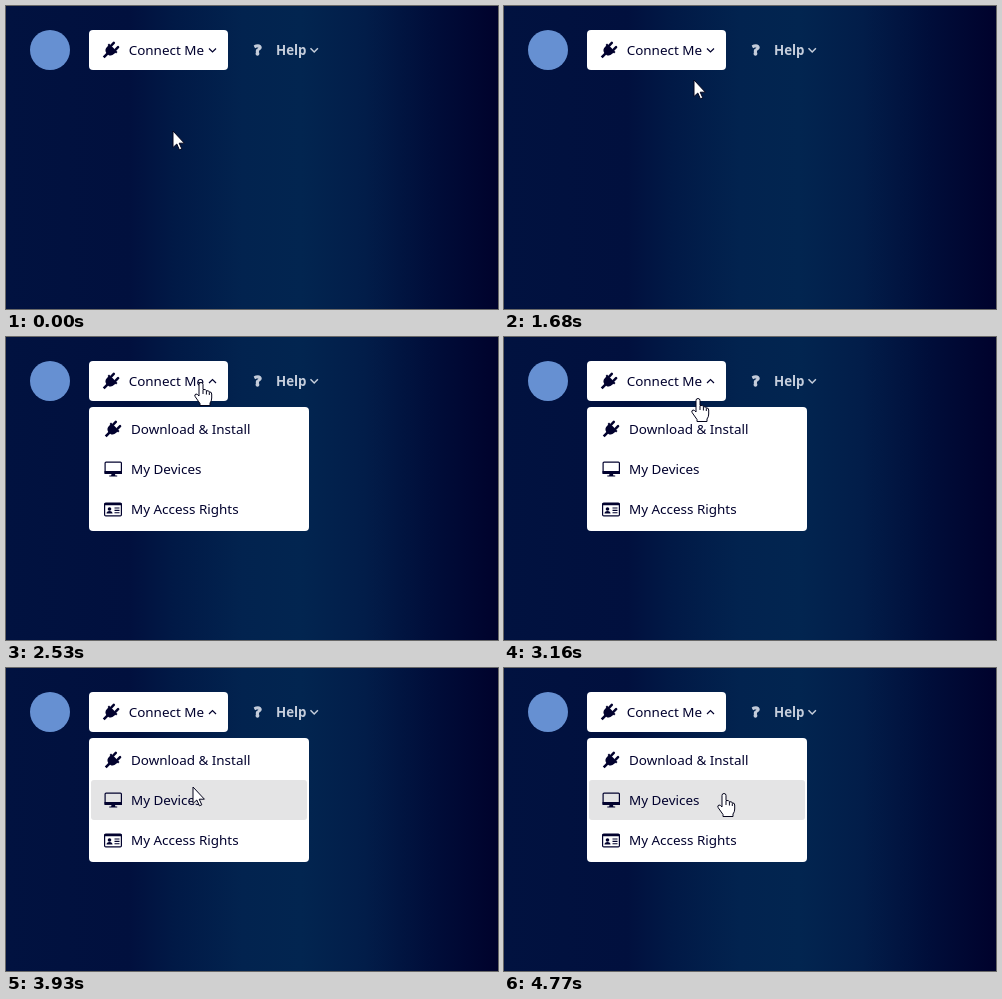
An HTML page that plays this animation: 492x303 px, repeating every 6510 ms.

```html
<!DOCTYPE html>
<html lang="en">
<head>
<meta charset="utf-8">
<title>Connect menu</title>
<style>
  html, body { margin: 0; width: 100%; height: 100%; overflow: hidden; background: #010f3d; }
  svg { display: block; width: 492px; height: 303px; }
  text { font: 500 13.45px "Noto Sans", "Open Sans", sans-serif; fill: #02022e; }
  .light { font-weight: 600; font-size: 13.3px; fill: #c5cddb; }
  .help-mark { font-weight: 900; font-size: 14.5px; stroke: #c5cddb; stroke-width: 1.3px; }
  .line { fill: none; stroke: #02022e; }
  .ink { fill: #02022e; }
</style>
</head>
<body>
<svg viewBox="0 0 492 303">
  <defs>
    <linearGradient id="sky">
      <stop offset="0" stop-color="#011240"/>
      <stop offset=".25" stop-color="#01103e"/>
      <stop offset=".34" stop-color="#011946"/>
      <stop offset=".48" stop-color="#02234f"/>
      <stop offset=".6" stop-color="#022550"/>
      <stop offset=".73" stop-color="#021d49"/>
      <stop offset=".87" stop-color="#000d39"/>
      <stop offset="1" stop-color="#00022c"/>
    </linearGradient>
    <g id="plug">
      <path class="ink" d="M-6-3.6H6V-1.6H5V0Q5 4.2 1.3 5V9.9H-1.3V5Q-5 4.2-5 0V-1.6H-6Z"/>
      <path class="line" stroke-width="2.5" stroke-linecap="round" d="M-3-7.4V-4M3-7.4V-4"/>
    </g>
  </defs>

  <rect width="492" height="303" fill="url(#sky)"/>
  <circle cx="44" cy="44" r="20" fill="#6690d2"/>

  <rect x="83" y="24" width="139" height="40" rx="4" fill="#fff"/>
  <use href="#plug" transform="translate(104.7 44.3) rotate(45)"/>
  <text x="122.7" y="49">Connect Me</text>
  <path id="chevron" class="line" stroke-width="1.2"/>

  <text class="light help-mark" x="248.5" y="49">?</text>
  <text class="light" x="270" y="49">Help</text>
  <path d="M304.5 42.3l3.7 3.7 3.7-3.7" fill="none" stroke="#c5cddb" stroke-width="1.5"/>

  <g id="menu">
    <rect x="83" y="70" width="220" height="124" rx="4" fill="#fff"/>
    <rect id="hover" x="85" width="216" height="40" rx="3" fill="#e4e4e5"/>
    <use href="#plug" transform="translate(106.7 92.3) rotate(45)"/>
    <text x="125" y="97">Download &amp; Install</text>
    <rect class="line" x="99.1" y="125.1" width="16.3" height="11.3" rx="1" stroke-width="1.2"/>
    <path class="ink" d="M98.5 134H116V136.9H98.5ZM105.5 136.9H109L109.4 138.4H111.2V139.6H103.3V138.4H105.1Z"/>
    <text x="125" y="137">My Devices</text>
    <rect class="line" x="98.6" y="166.1" width="16.8" height="12.8" rx="1.2" stroke-width="1.2"/>
    <path class="ink" d="M98.5 166H115.5V168.2H98.5ZM100.5 176.6Q100.5 174 103.5 174T106.5 176.6Z"/>
    <circle class="ink" cx="103.5" cy="172" r="1.8"/>
    <path class="line" stroke-width="1.1" d="M108.5 171H113.5M108.5 173.4H113.5M108.5 175.8H113.5"/>
    <text x="125" y="177">My Access Rights</text>
  </g>

  <g id="cursor" fill="#fff" stroke="#05051c" stroke-width="1" stroke-linejoin="round">
    <path id="arrow" d="M0 0V16.5L3.8 13 6.4 18.8 8.8 17.8 6.2 12.2H11.4Z"/>
    <g id="hand">
      <path d="M-2 2.5Q-2 .5 0 .5T2 2.5V7.5Q5 7 5.5 8.8Q8 8.2 8.3 10Q10.7 9.6 10.7 12V16Q10.7 19 9 21V23.5H-1V21.5L-5.8 14.7Q-7 12.5-5 12Q-3.8 11.8-2 14Z"/>
      <path d="M2 8V12M5.4 9V12.5M8.3 10.3V13" fill="none"/>
    </g>
  </g>
</svg>
<script>
  const LOOP = 6510, MENU_OPEN = 2530;
  // time, x, y of the pointer's hotspot
  const PATH = [
    [980, 167, 125], [1050, 167, 124], [1190, 167, 123], [1400, 173, 110],
    [1680, 190, 74], [1820, 193, 65], [1890, 194, 58], [2180, 195, 46],
    [2390, 195, 45], [3020, 195, 45], [3440, 191, 94], [3930, 187, 119],
    [4140, 191, 131], [4420, 211, 129], [4770, 220, 125]
  ];
  const el = id => document.getElementById(id);
  const show = (id, on) => el(id).setAttribute('display', on ? 'inline' : 'none');

  function pointerAt(t) {
    const next = PATH.findIndex(p => p[0] > t);
    if (next === 0) return PATH[0].slice(1);
    if (next < 0) return PATH[PATH.length - 1].slice(1);
    const a = PATH[next - 1], b = PATH[next];
    const k = (t - a[0]) / (b[0] - a[0]);
    return [1, 2].map(i => Math.round(a[i] + (b[i] - a[i]) * k));
  }

  function draw(time) {
    const t = time % LOOP;
    const shift = t < 2180 ? 0 : 10;
    const tick = Math.floor((t - shift) / 70) * 70 + shift;
    const [x, y] = pointerAt(tick);
    const open = t >= MENU_OPEN;
    const inRow = open && y >= 72;
    // the pointer lags briefly when it crosses into the second row
    const hand = y < 64 || (inRow && (y < 112 || y > 120));

    show('menu', open);
    show('hover', inRow);
    el('hover').setAttribute('y', y < 112 ? 72 : 112);
    el('chevron').setAttribute('d', open ? 'M203 46l3.5-3.5 3.5 3.5' : 'M203 42.5l3.5 3.5 3.5-3.5');
    show('hand', hand);
    show('arrow', !hand);
    el('cursor').setAttribute('transform', `translate(${x} ${y})`);
  }

  const start = performance.now();
  function frame() {
    draw(performance.now() - start);
    requestAnimationFrame(frame);
  }
  frame();
</script>
</body>
</html>
```
